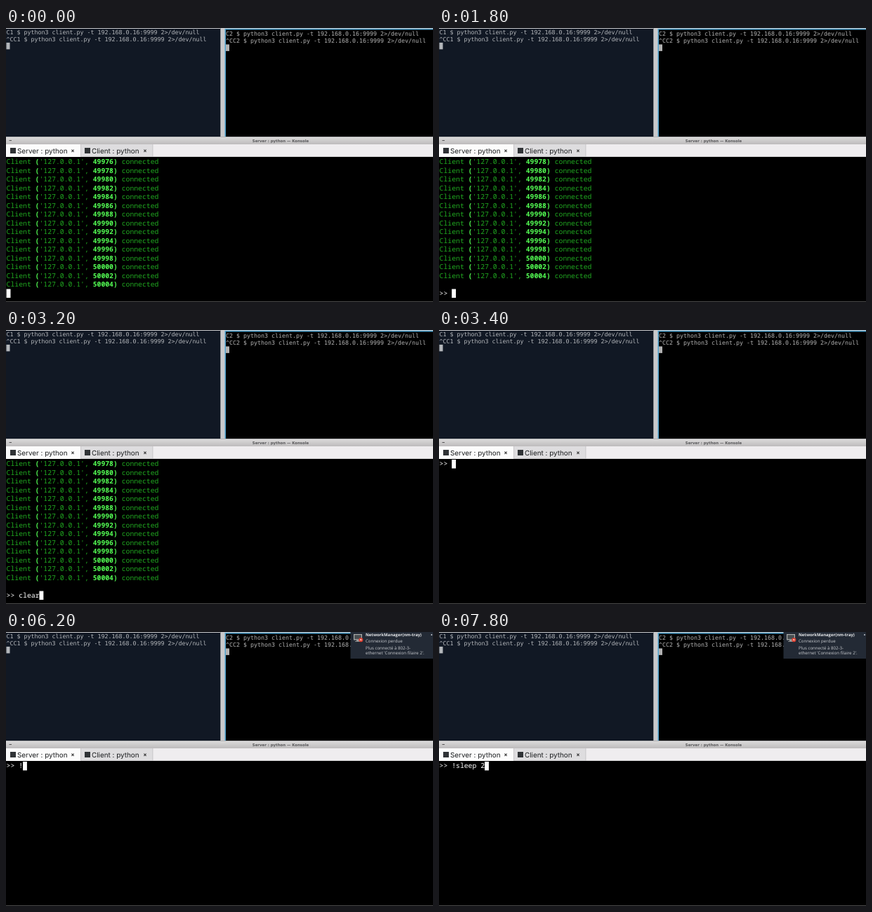
These frames come from a looping animation (608x391 px, 8 s). An HTML page with a canvas:

```html
<!DOCTYPE html>
<html lang="en">
<head>
<meta charset="utf-8">
<title>Terminal session</title>
<style>
  html, body { margin: 0; width: 100%; height: 100%; overflow: hidden; background: #000; }
  canvas { display: block; width: 608px; height: 391px; }
</style>
</head>
<body>
<canvas id="stage" width="608" height="391"></canvas>
<script>
const ctx = document.getElementById('stage').getContext('2d');
const LOOP = 8000;
const CELL = 5.86, ROW = 12.5, LEFT = 0.6, TOP = 185;
const SMALL = '8.3px "DejaVu Sans Mono", monospace';
const MONO = '9.77px "Noto Sans Mono", monospace';
const BOLD = 'bold ' + MONO;
const GREEN = '#20a820', BRIGHT = '#54ff54';

// [time in ms, text after the prompt]
const TYPED = [
  [1200, ''], [2000, 'c'], [2200, 'cl'], [2400, 'cle'], [2600, 'clea'], [3200, 'clear'],
  [3400, ''], [5800, '!'], [6400, '!s'], [6600, '!sl'], [6800, '!slee'], [7000, '!sleep'],
  [7400, '!sleep '], [7800, '!sleep 2']
];
const ENTER = 1200, CLEAR = 3400, NOTICE = 6200;

function rect(x, y, w, h, color) {
  ctx.fillStyle = color;
  ctx.fillRect(x, y, w, h);
}

function text(str, x, y, font, color, align = 'left') {
  ctx.font = font;
  ctx.fillStyle = color;
  ctx.textAlign = align;
  ctx.fillText(str, x, y);
}

// Monospaced text on a fixed character grid
function grid(str, x, y, cell, font, color) {
  ctx.font = font;
  ctx.fillStyle = color;
  ctx.textAlign = 'left';
  [...str].forEach((ch, i) => ctx.fillText(ch, x + i * cell, y));
}

function put(str, col, row, font, color) {
  grid(str, LEFT + col * CELL, TOP + 9.2 + row * ROW, CELL, font, color);
}

function cursor(col, row) {
  rect(LEFT + col * CELL, TOP + row * ROW, CELL, ROW, '#fff');
}

function shell(name, x, y, pitch, color) {
  const cmd = name + ' $ python3 client.py -t 192.168.0.16:9999 2>/dev/null';
  grid(cmd, x, y, 5, SMALL, color);
  grid('^C' + cmd, x, y + pitch, 5, SMALL, color);
  rect(x, y + pitch + 2, 5, 9.5, color);
}

function clients() {
  rect(0, 0, 608, 155, '#c9c9cb');
  rect(0, 1, 305, 154, '#111824');
  rect(305, 0, 1, 155, '#8c8f94');
  rect(311.5, 1, 296.5, 154, '#4fa3cf');
  rect(313, 2.5, 295, 152.5, '#000');
  shell('C1', 0.5, 9, 9.9, '#b4b7bb');
  shell('C2', 313, 11, 10.4, '#b2b2b2');
}

function cross(x, y) {
  ctx.strokeStyle = '#333';
  ctx.lineWidth = 1.1;
  ctx.beginPath();
  ctx.moveTo(x - 1.6, y - 1.6);
  ctx.lineTo(x + 1.6, y + 1.6);
  ctx.moveTo(x + 1.6, y - 1.6);
  ctx.lineTo(x - 1.6, y + 1.6);
  ctx.stroke();
}

function tab(label, x, w, color, labelX, closeX) {
  rect(x, 166, w, 18, color);
  rect(x + w, 166, 0.8, 18, '#b9b9bb');
  rect(labelX - 10, 171, 8, 8, '#303336');
  text(label, labelX, 178.6, '9.9px Inter, sans-serif', '#1b1d1f');
  cross(closeX, 175.2);
}

function windowFrame() {
  const g = ctx.createLinearGradient(0, 155, 0, 166);
  g.addColorStop(0, '#dedddd');
  g.addColorStop(1, '#bdbbbc');
  rect(0, 155, 608, 11, g);
  rect(0, 155, 608, 0.7, '#a4a4a6');
  rect(4.5, 160, 3.5, 1, '#555');
  text('Server : python — Konsole', 391, 162.6, 'bold 5.4px "DejaVu Sans", sans-serif', '#5a5a5c', 'center');
  rect(0, 166, 608, 18, '#efedef');
  tab('Server : python', 0, 106, '#fcfcfc', 16, 95);
  tab('Client : python', 106.8, 101.7, '#dedddf', 122, 198);
  rect(106.8, 183.3, 501.2, 0.7, '#c4c4c6');
  rect(0, 184, 608, 207, '#000');
  rect(0, 390, 608, 1, '#4a4a4a');
}

function connection(port, row) {
  put('Client', 0, row, MONO, GREEN);
  put('(', 7, row, BOLD, BRIGHT);
  put("'127.0.0.1',", 8, row, MONO, GREEN);
  put(port + ')', 21, row, BOLD, BRIGHT);
  put('connected', 28, row, MONO, GREEN);
}

function server(t) {
  if (t < CLEAR) {
    const first = t < ENTER ? 49976 : 49978;
    for (let port = first, row = 0; port <= 50004; port += 2) connection(port, row++);
  }
  const row = t < CLEAR ? 15 : 0;
  if (t < ENTER) return cursor(0, row);
  const line = '>> ' + TYPED.filter(step => step[0] <= t).pop()[1];
  put(line, 0, row, MONO, '#fff');
  cursor(line.length, row);
}

function notice() {
  const font = '6.12px "Open Sans", sans-serif';
  rect(490.5, 0, 117.5, 38, '#232a35');
  rect(495, 3, 12, 8.5, '#a9aba9');
  rect(496.2, 4.2, 9.6, 6, '#484d50');
  rect(499, 11.5, 4, 1.5, '#a9aba9');
  rect(497, 13, 8, 1, '#85888a');
  ctx.fillStyle = '#dc3c2c';
  ctx.beginPath();
  ctx.arc(505.3, 11.2, 3, 0, Math.PI * 2);
  ctx.fill();
  ctx.strokeStyle = '#fff';
  ctx.lineWidth = 0.8;
  ctx.beginPath();
  ctx.moveTo(504.2, 10.1);
  ctx.lineTo(506.4, 12.3);
  ctx.moveTo(506.4, 10.1);
  ctx.lineTo(504.2, 12.3);
  ctx.stroke();
  text('NetworkManager(nm-tray)', 512, 5.8, 'bold 5.93px "Open Sans", sans-serif', '#e4e6e8');
  text('Connexion perdue', 512, 15.2, font, '#c9ccd0');
  text('Plus connecté à 802-3-', 512, 24.6, font, '#c9ccd0');
  text("ethernet 'Connexion filaire 2'.", 512, 32.2, font, '#c9ccd0');
  rect(605, 3, 2, 2, '#9a9fa6');
}

function draw(now) {
  const t = now % LOOP;
  ctx.textRendering = 'geometricPrecision';
  clients();
  windowFrame();
  server(t);
  if (t >= NOTICE) notice();
}

const start = performance.now();
function tick() {
  draw(performance.now() - start);
  requestAnimationFrame(tick);
}
tick();
</script>
</body>
</html>
```
